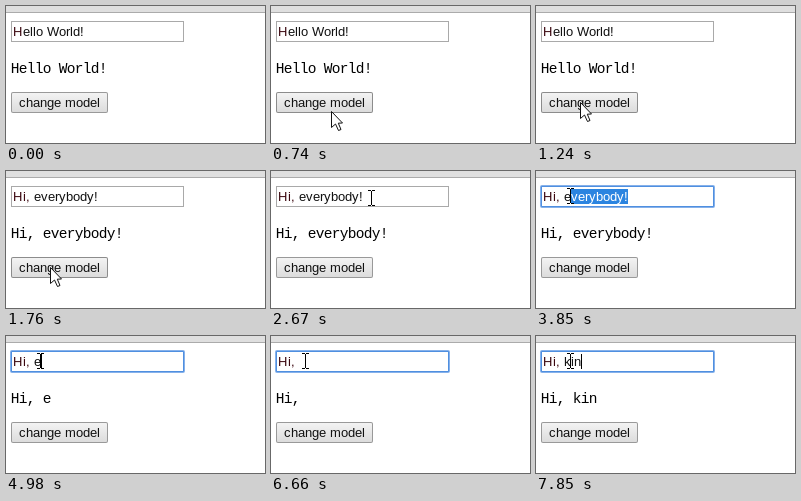
An HTML page with a canvas for the animation above (8000 ms loop, 259 by 137 pixels).

```html
<!DOCTYPE html>
<html lang="en">
<head>
<meta charset="utf-8">
<title>Two-way binding</title>
<style>
  html, body { margin: 0; width: 100%; height: 100%; overflow: hidden; background: #fff; }
  canvas { display: block; }
</style>
</head>
<body>
<canvas id="stage" width="259" height="137"></canvas>
<script>
const ctx = document.getElementById('stage').getContext('2d', { alpha: false });
const LOOP = 8000;
const SANS = 'px "Liberation Sans", Arial, sans-serif';
const MONO = '14.5px "Liberation Mono", "Courier New", monospace';
const FIELD_X = 7;

// Each track holds [start time, value...]; values change in hard steps.
const TEXT = [[0, 'Hello World!'], [1760, 'Hi, everybody!'], [4980, 'Hi, e'],
  [5130, 'Hi, '], [7440, 'Hi, k'], [7590, 'Hi, ki'], [7850, 'Hi, kin']];
const POINTER = [[0, ''], [620, 'arrow', 66, 124], [740, 'arrow', 60, 105],
  [860, 'arrow', 54, 89], [1000, 'arrow', 51, 91], [1120, 'arrow', 47, 94],
  [1240, 'arrow', 44, 96], [2160, 'arrow', 60, 77], [2280, 'beam', 84, 48],
  [2410, 'beam', 96, 20], [2670, 'beam', 97, 19], [3580, 'beam', 77, 18],
  [3700, 'beam', 51, 17], [3850, 'beam', 31, 17]];
const BUTTON = [[0, 'idle'], [740, 'hover'], [1640, 'down'], [1760, 'hover'], [2160, 'idle']];
const SELECT_FROM = [[0, -1], [3580, 11], [3700, 8], [3850, 5], [4980, -1]];
const CARET = [[0, false], [2960, true], [3580, false], [4980, true],
  [5630, false], [6160, true], [6660, false], [7160, true]];

function at(track, t) {
  let found = track[0];
  for (const key of track) if (key[0] <= t) found = key;
  return found;
}

function rect(x, y, w, h, color) {
  ctx.fillStyle = color;
  ctx.fillRect(x, y, w, h);
}

function roundBox(x, y, w, h, r, fill) {
  ctx.beginPath();
  ctx.moveTo(x + r, y);
  ctx.arcTo(x + w, y, x + w, y + h, r);
  ctx.arcTo(x + w, y + h, x, y + h, r);
  ctx.arcTo(x, y + h, x, y, r);
  ctx.arcTo(x, y, x + w, y, r);
  ctx.fillStyle = fill;
  ctx.fill();
}

// Whole-pixel advances, as in a hinted 13px interface font.
const advances = {};
function advance(ch) {
  if (!(ch in advances)) {
    ctx.font = 100 + SANS;
    advances[ch] = Math.round(ctx.measureText(ch).width * 0.13 + 0.15);
  }
  return advances[ch];
}

function textWidth(text) {
  let w = 0;
  for (const ch of text) w += advance(ch);
  return w;
}

function label(text, x, y, color) {
  for (const ch of text) {
    const step = advance(ch);
    ctx.font = 13 + SANS;
    ctx.fillStyle = color;
    ctx.fillText(ch, x, y);
    x += step;
  }
}

function drawField(text, t) {
  if (t >= 2960) {
    roundBox(4, 14, 175, 23, 2, '#86b1ea');
    roundBox(5, 15, 173, 21, 1, '#4f8fe0');
    rect(6, 16, 171, 19, '#fff');
  } else {
    rect(5, 15, 173, 21, '#a9a9a9');
    rect(6, 16, 171, 19, '#fff');
  }
  const from = at(SELECT_FROM, t)[1];
  const plain = from < 0 ? text : text.slice(0, from);
  const head = plain.startsWith('Hi') ? 3 : 1;
  const end = FIELD_X + textWidth(plain);
  label(plain.slice(0, head), FIELD_X, 30, '#3c0810');
  label(plain.slice(head), FIELD_X + textWidth(plain.slice(0, head)), 30, '#111');
  if (from >= 0) {
    const rest = text.slice(from);
    rect(end, 18, textWidth(rest), 15, '#2b84e0');
    label(rest, end, 30, '#fff');
  }
  if (at(CARET, t)[1]) rect(end, 18, 1, 15, '#000');
}

function drawMono(text) {
  ctx.font = MONO;
  ctx.fillStyle = '#000';
  ctx.textAlign = 'center';
  [...text].forEach((ch, i) => ctx.fillText(ch, 9 + i * 8, 67));
  ctx.textAlign = 'left';
}

function drawButton(state) {
  const down = state === 'down';
  const border = { idle: '#999', hover: '#8c8c8c', down: '#858585' }[state];
  const fill = ctx.createLinearGradient(0, 87, 0, 106);
  fill.addColorStop(0, down ? '#d8d8d8' : '#f3f3f3');
  fill.addColorStop(1, down ? '#e8e8e8' : '#dcdcdc');
  roundBox(5, 86, 97, 21, 2, border);
  roundBox(6, 87, 95, 19, 1, fill);
  label('change model', 13, 101, '#111');
}

function drawArrow(x, y) {
  const outline = [[0, 0], [0, 16], [4, 12.5], [7, 19], [9.5, 18], [6.8, 11.7], [11, 11.5]];
  ctx.beginPath();
  outline.forEach(([dx, dy]) => ctx.lineTo(x + dx + 0.5, y + dy + 0.5));
  ctx.closePath();
  ctx.fillStyle = '#fff';
  ctx.fill();
  ctx.strokeStyle = '#111';
  ctx.lineWidth = 1;
  ctx.stroke();
}

function drawBeam(x, y) {
  for (const row of [y, y + 15]) {
    rect(x, row, 3, 1, '#000');
    rect(x + 4, row, 3, 1, '#000');
  }
  rect(x + 3, y + 1, 1, 14, '#000');
}

function draw(now) {
  const t = now % LOOP;
  const text = at(TEXT, t)[1];
  rect(0, 0, 259, 137, '#fff');
  rect(0, 0, 259, 6, '#dfdfdf');
  rect(0, 6, 259, 1, '#ababab');
  drawField(text, t);
  drawMono(text);
  drawButton(at(BUTTON, t)[1]);
  const [, kind, x, y] = at(POINTER, t);
  if (kind === 'arrow') drawArrow(x, y);
  if (kind === 'beam') drawBeam(x, y);
}

const start = performance.now();
function tick() {
  draw(performance.now() - start);
  requestAnimationFrame(tick);
}
tick();
</script>
</body>
</html>
```
